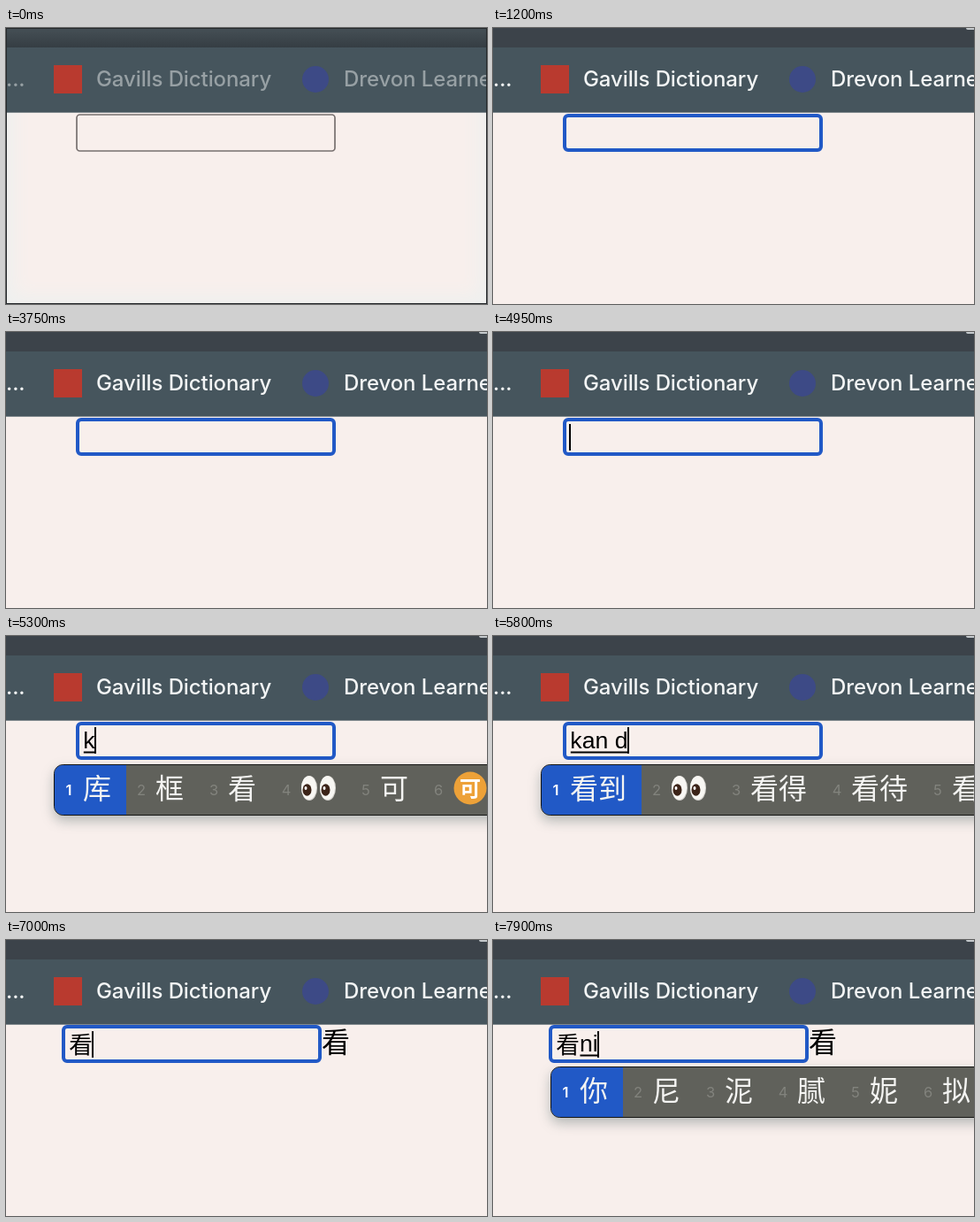
Recreate the animation shown at these times as an HTML page. Size 544 by 312 pixels, loop 8 s.

```html
<!DOCTYPE html>
<html lang="en">
<head>
<meta charset="utf-8">
<title>Typing with an input method</title>
<style>
  html, body { margin: 0; width: 100%; height: 100%; overflow: hidden; background: #f8efec; }
  #stage { position: relative; width: 544px; height: 312px; overflow: hidden; }
  svg { position: absolute; left: 0; top: 0; }
  text { white-space: pre; }
  .tab { font: 500 24px Inter, sans-serif; letter-spacing: -.1px; fill: #f3f5f5; }
  .typed { font: 26.67px "Liberation Sans", sans-serif; }
  .han { font-family: "Noto Sans CJK SC", "Noto Sans CJK", sans-serif; }
  .value { font-size: 26.67px; }
  .echo { font-size: 32px; }
  .cand { font-size: 32px; font-weight: 500; fill: #f4f4f2; }
  .num { font: 16.5px Inter, sans-serif; fill: #82837d; text-anchor: middle; }
  .num.on { font-weight: 600; fill: #fff; }
  #panel { filter: drop-shadow(0 6px 7px rgba(60, 85, 85, .36)); }
  #veil { position: absolute; inset: 0; }
  #veil div { position: absolute; box-sizing: border-box; }
  #top { left: 0; top: 0; width: 544px; height: 22px; background: linear-gradient(#465056, #353d43); }
  #page { left: 0; top: 96px; width: 544px; height: 216px; overflow: hidden; }
  #page div { inset: -60px 0 0; border-radius: 10px; box-shadow: inset 0 0 20px 9px #eef0ef, 0 0 0 12px #eef0ef; }
  #edge { inset: 0; border: 1px solid #25292c; }
</style>
</head>
<body>
<div id="stage">
  <svg width="544" height="312" viewBox="0 0 544 312">
    <rect width="544" height="312" fill="#f8efec"/>
    <rect width="544" height="22" fill="#3c434a"/>
    <rect y="22" width="544" height="73" fill="#46555d"/>
    <rect y="95" width="544" height="1" fill="#818a8f"/>
    <rect x="535" y="-3" width="14" height="5" rx="2" fill="#c3c8cb"/>
    <g id="tabs" class="tab">
      <text x="0" y="66">...</text>
      <text x="102" y="66">Gavills Dictionary</text>
      <text x="382" y="66">Drevon Learner</text>
    </g>
    <rect x="54" y="42" width="32" height="32" fill="#b93a2f"/>
    <circle cx="350" cy="58" r="15" fill="#3d4a86"/>
  </svg>
  <div id="veil">
    <div id="top"></div>
    <div id="page"><div></div></div>
    <div id="edge"></div>
  </div>
  <svg width="544" height="312" viewBox="0 0 544 312">
    <g id="field"></g>
    <g id="panel"></g>
  </svg>
</div>
<script>
const LOOP = 8000;
const $ = id => document.getElementById(id);
const BLUE = '#2159c6';

// Each scene: start time, then what differs from an active, focused, empty field.
const scenes = [
  [0, { dim: 1, blur: true, caret: 0 }],
  [750, { dim: .5 }],
  [800, {}],
  [1200, { caret: 0 }],
  [1600, {}],
  [1800, { dim: 1, caret: 0 }],
  [2500, { dim: 1, blur: true, caret: 0 }],
  [3350, { dim: .5 }],
  [3400, {}],
  [3750, { caret: 0 }],
  [4150, {}],
  [4550, { caret: 0 }],
  [4950, {}],
  [5300, { comp: 'k', cands: '库 框 看 👀 可 🉑' }],
  [5400, { comp: 'ka', cands: '卡 咖 喀 咔 咯 佧' }],
  [5550, { comp: 'kan', cands: '看 👀 砍 刊 堪 坎' }],
  [5800, { comp: 'kan d', cands: '看到 👀 看得 看待 看电' }],
  [5900, { comp: 'kan da', cands: '看大 看到 看待 看达 看答' }],
  [6000, { comp: 'kan dao', cands: '看到 👀 看倒 砍刀 看道' }],
  [6200, { done: '看到' }],
  [6600, { done: '看到', caret: 0 }],
  [7000, { done: '看' }],
  [7350, { done: '看', caret: 0 }],
  [7500, { done: '看', comp: 'n' }],
  [7550, { done: '看', comp: 'n', cands: '你 那 呢 能 年 女' }],
  [7900, { done: '看', comp: 'ni', cands: '你 尼 泥 腻 妮 拟' }]
];

const EM = 26.67;
const advance = { k: .5, i: .222, ' ': .278 };
const widthOf = s => [...s].reduce((w, c) => w + EM * (advance[c] || .556), 0);

const rect = (x, y, w, h, attrs = '') =>
  `<rect x="${x}" y="${y}" width="${w}" height="${h}" ${attrs}/>`;
const text = (x, y, cls, s) => `<text x="${x}" y="${y}" class="${cls}">${s}</text>`;
const oval = (x, y, rx, ry, fill) =>
  `<ellipse cx="${x}" cy="${y}" rx="${rx}" ry="${ry}" fill="${fill}"/>`;

const eye = (x, y) => oval(x, y, 9, 14, '#d5d3cf') + oval(x - .5, y - .5, 8.5, 13.3, '#f8f7f3') +
  oval(x - 2.5, y + 2, 5, 6.8, '#3c2418') + oval(x - 4, y, 1.5, 2, '#fff');

function glyph(s, x, y) {
  if (s === '👀') return eye(x + 10, y + 27) + eye(x + 31, y + 27);
  if (s === '🉑') return oval(x + 20, y + 27, 18.5, 18.5, '#eda138') +
    `<text x="${x + 8}" y="${y + 36}" class="han" font-size="24" font-weight="700" fill="#fff">可</text>`;
  return text(x, y + 39, 'han cand', s);
}

function panel(x, y, list) {
  let out = rect(x + .5, y + .5, 560, 57, 'rx="10" fill="#60615b" stroke="#141513"');
  let left = x;
  list.split(' ').forEach((s, i) => {
    const w = 50 + (/👀|🉑/.test(s) ? 40 : 32 * s.length);
    if (!i) {
      const r = x + w;
      out += `<path d="M${r} ${y + 1}H${x + 10}a9 9 0 0 0-9 9v38a9 9 0 0 0 9 9H${r}z" fill="${BLUE}"/>`;
    }
    out += text(left + 17, y + 35, i ? 'num' : 'num on', i + 1) + glyph(s, left + 33, y);
    left += w;
  });
  return out;
}

function draw({ dim = 0, blur, caret = 1, done = '', comp = '', cands }) {
  const x = 79 - 16 * done.length;
  const y = done ? 96 : 97;
  const start = x + 8.3 + EM * done.length;
  const end = start + widthOf(comp);

  let out = blur
    ? rect(x + 1, y + 1, 292, 41, 'rx="3.5" fill="none" stroke="#77706f" stroke-width="1.7"')
    : rect(x + 2, y + 2, 290, 39, `rx="4" fill="none" stroke="${BLUE}" stroke-width="4"`);
  if (done) {
    out += text(x + 8.3, y + 32, 'han value', done) + text(x + 294, y + 31, 'han echo', done);
  }
  if (comp) {
    out += text(start, y + 30, 'typed', comp) + rect(start + .5, y + 33.5, end - start - 1, 2);
  }
  if (caret) out += rect(Math.round(end - 1), comp || done ? 103 : 104, 2, 30);

  $('field').innerHTML = out;
  $('panel').innerHTML = cands ? panel(Math.round(start - 33), done ? 143 : 145, cands) : '';
  $('veil').style.opacity = dim;
  $('tabs').style.fillOpacity = 1 - .53 * dim;
}

let shown;
function tick() {
  const t = performance.now() % LOOP;
  const scene = scenes.findLast(s => s[0] <= t);
  if (scene !== shown) draw((shown = scene)[1]);
  requestAnimationFrame(tick);
}
tick();
</script>
</body>
</html>
```
